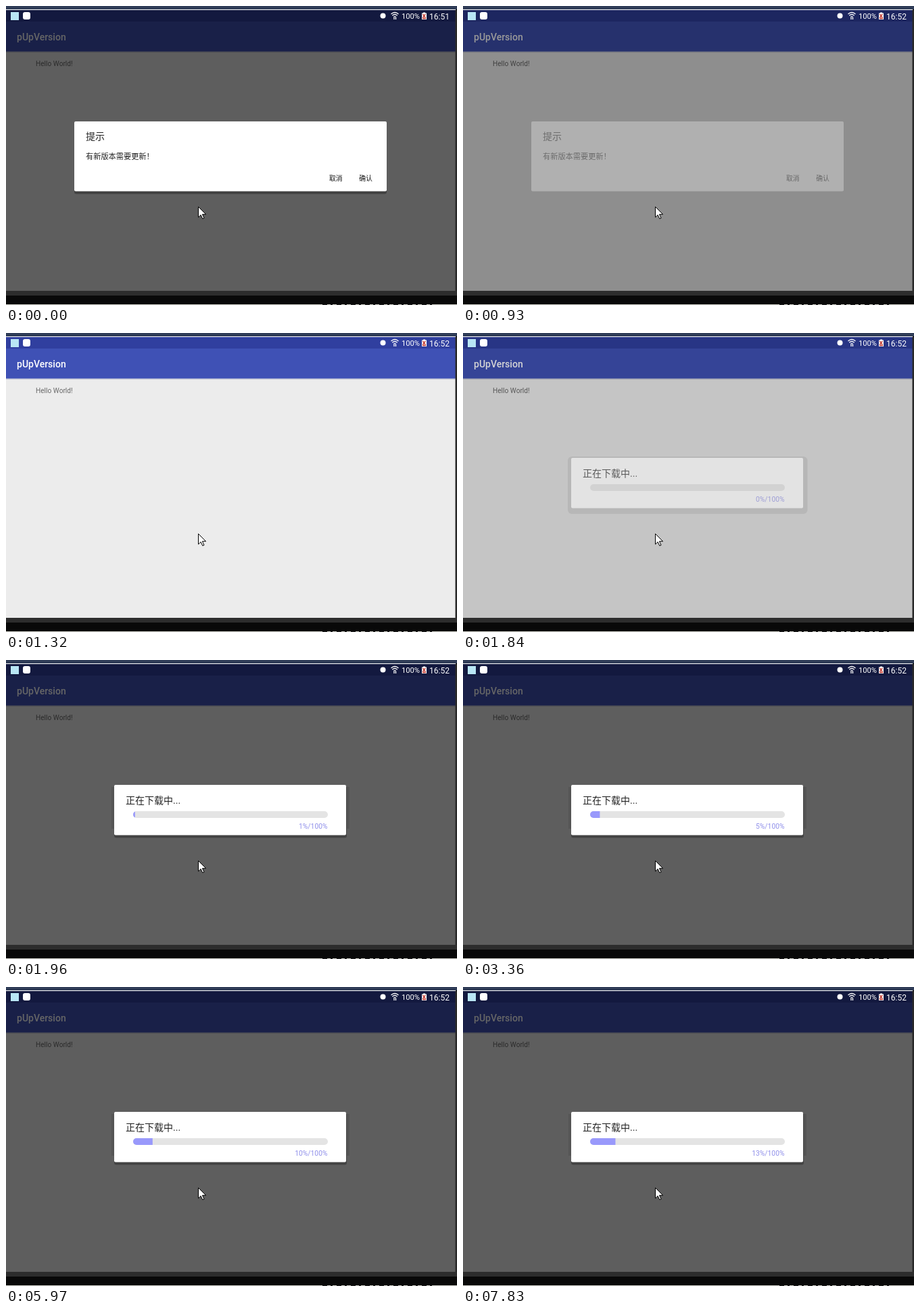
An HTML page that plays this animation: 667 by 443 pixels, repeating every 8 s.

```html
<!DOCTYPE html>
<html lang="zh-CN">
<head>
<meta charset="utf-8">
<title>Update dialog</title>
<style>
  html, body { margin: 0; width: 100%; height: 100%; overflow: hidden; background: #080808; }
  svg { display: block; width: 667px; height: 443px; font-family: Roboto, "Noto Sans CJK SC", "Noto Sans CJK", sans-serif; }
  .title { font-size: 14px; fill: #222; }
  .button { font-size: 9.8px; font-weight: 500; fill: #111; }
</style>
</head>
<body>
<svg viewBox="0 0 667 443">
  <!-- app -->
  <rect y="6" width="665" height="416" fill="#ececec"/>
  <rect y="6" width="665" height="17" fill="#303f9f"/>
  <rect y="23" width="665" height="44" fill="#3f51b5"/>
  <rect y="67" width="665" height="1" fill="#8e98cc"/>
  <rect y="68" width="665" height="1" fill="#c9cbd6"/>
  <text x="16" y="51" font-size="14" font-weight="500" fill="#fff">pUpVersion</text>
  <text x="44" y="89.4" font-size="10.15" fill="#686868">Hello World!</text>
  <rect id="dim" y="6" width="665" height="416"/>

  <!-- status bar -->
  <rect x="7" y="9" width="12" height="12" fill="#b9e6f5"/>
  <rect x="25" y="9" width="11" height="11" rx="3" fill="#fff"/>
  <circle cx="557.5" cy="14.5" r="4" fill="#fff"/>
  <g fill="none" stroke="#fff" stroke-width="1.3">
    <path d="M569.5 12q5.5-5 11 0M571.3 14.2q3.7-3.3 7.4 0M573.2 16.4q1.8-1.6 3.6 0"/>
    <path d="M574 17v3M576.5 17v3"/>
  </g>
  <path d="M615 10.5h2v-1h3v1h2V20h-7z" fill="#fff"/>
  <path d="M616.3 12l4 5.500M620.3 12l-4 5.500M616 18.500h5" stroke="#c33a30" stroke-width="1.3"/>
  <g fill="#fff">
    <text x="585" y="19.3" font-size="11.2">100%</text>
    <text id="clock" x="626" y="19.6" font-size="12"></text>
  </g>

  <!-- prompt -->
  <rect id="promptShadow" x="101" y="173" width="462" height="105.500" rx="3" fill="#414141"/>
  <g id="prompt">
    <rect x="101" y="171" width="462" height="103.500" rx="2" fill="#fff"/>
    <text class="title" x="118" y="198.2">提示</text>
    <text x="118" y="227.3" font-size="11.2" fill="#222">有新版本需要更新！</text>
    <text class="button" x="478" y="258.7">取消</text>
    <text class="button" x="522.3" y="258.7">确认</text>
  </g>

  <!-- download -->
  <rect id="softShadow" x="155" y="183" width="354.500" height="85" rx="6" fill="#b7b7b7"/>
  <g id="hardShadow">
    <path d="M156 188h352v62h-352z" fill="#555"/>
    <rect x="160" y="187" width="344" height="76.500" rx="3" fill="#434343"/>
  </g>
  <g id="download">
    <rect x="160" y="185" width="343" height="74.500" rx="2" fill="#fff"/>
    <text class="title" x="177" y="213">正在下载中...</text>
    <clipPath id="track"><rect x="188" y="224" width="288" height="10" rx="5"/></clipPath>
    <g clip-path="url(#track)">
      <rect x="188" y="224" width="288" height="10" fill="#e4e4e4"/>
      <rect id="bar" x="188" y="224" height="10" fill="#9999fb"/>
    </g>
    <text id="label" x="475.500" y="249.500" font-size="10.3" text-anchor="end" fill="#9090ea"></text>
  </g>

  <!-- surrounding window -->
  <rect width="667" height="5" fill="#2f3c57"/>
  <rect y="5" width="665" height="1" fill="#fff"/>
  <rect x="664.500" y="6" width="2.500" height="424" fill="#292929"/>
  <rect y="422" width="667" height="7" fill="#2d2d2d"/>
  <rect y="429" width="667" height="13" fill="#090909"/>
  <rect y="442" width="667" height="1" fill="#d8d8d0"/>
  <path d="M468 442.500H636" stroke="#222" stroke-dasharray="7 5 3 6"/>
  <path d="M284.500 297.500V313l3.600-3.400 2.700 5.600 2.200-1-2.600-5.500h5.200z" fill="#fff" stroke="#000"/>
</svg>
<script>
const LOOP = 8000;
// time, dim, prompt opacity, download opacity
const fades = [
  [0, .6, 1, 0], [930, .4, .3, 0], [1050, .2, 0, 0], [1200, .06, 0, 0],
  [1320, 0, 0, 0], [1840, .165, 0, .62], [1960, .6, 0, 1]
];
// moments at which the download gains one percent
const ticks = [1960, 2380, 2790, 3080, 3360, 3790, 4340, 4890, 5420, 5970, 6840, 7400, 7830];
const el = id => document.getElementById(id);
const fade = (id, value) => el(id).setAttribute("opacity", value);

function draw(now) {
  const t = now % LOOP;
  const [, dim, prompt, download] = fades.filter(f => f[0] <= t).pop();
  const percent = ticks.filter(tick => tick <= t).length;
  fade("dim", dim);
  fade("prompt", prompt);
  fade("promptShadow", +(prompt === 1));
  fade("download", download);
  fade("softShadow", +(download > 0 && download < 1));
  fade("hardShadow", +(download === 1));
  el("bar").setAttribute("width", 2.88 * percent);
  el("label").textContent = percent + "%/100%";
  el("clock").textContent = t < 500 ? "16:51" : "16:52";
  requestAnimationFrame(() => draw(performance.now()));
}
draw(performance.now());
</script>
</body>
</html>
```
